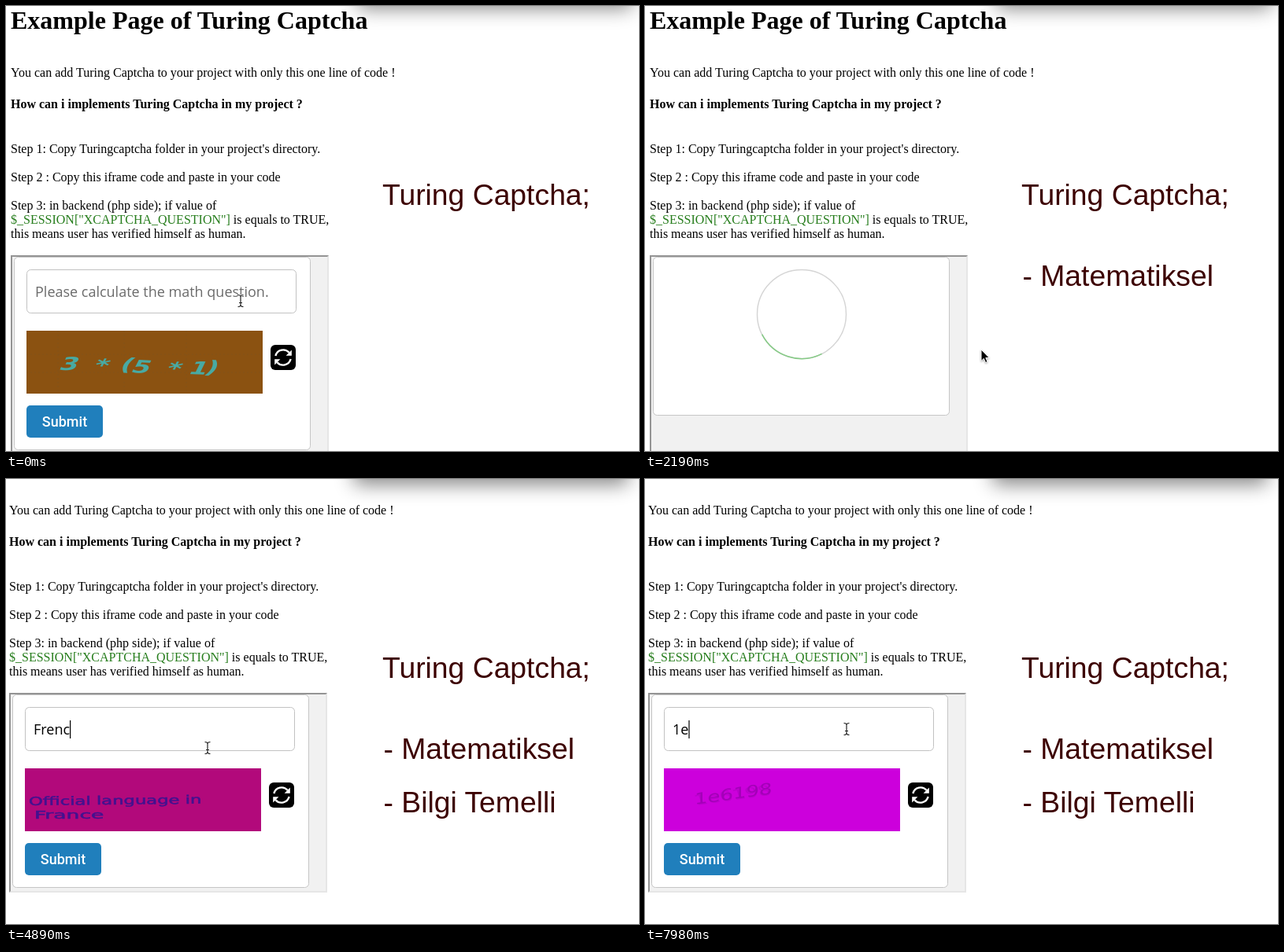
Write an HTML page that moves like this. It is 804x566 px and loops after 8 s.

```html
<!DOCTYPE html>
<html lang="en">
<head>
<meta charset="utf-8">
<title>Turing Captcha</title>
<style>
  html, body { margin: 0; width: 100%; height: 100%; overflow: hidden; background: #fff; }
  #stage { position: relative; width: 804px; height: 566px; overflow: hidden; background: #fff; }
  svg { position: absolute; inset: 0; display: block; }
  #shadow {
    position: absolute; left: 446px; top: -44px; width: 350px; height: 40px;
    border-radius: 8px; box-shadow: 0 7px 24px rgba(0, 0, 0, .48);
  }
  .page { font: 16px "Liberation Serif", Times, serif; fill: #000; }
  .page .title { font-size: 32px; font-weight: bold; }
  .page .bold { font-weight: bold; }
  .page .code { fill: #267d1c; }
  .notes { font: 37.3px "Liberation Sans", Helvetica, sans-serif; fill: #3c0000; }
  .field { font: 18px "Open Sans", sans-serif; }
  .submit { font: 500 18px Roboto, sans-serif; fill: #fff; text-anchor: middle; }
  .hint { font: 13px Inter, sans-serif; fill: #111; }
  .sum { font: bold 24px "DejaVu Sans", sans-serif; fill: #48aaa3; }
  .quiz { font: 14px "DejaVu Sans", sans-serif; fill: #43128f; stroke: #43128f; stroke-width: .5; }
  .hash { font: 23px "DejaVu Sans", sans-serif; fill: #a300b8; }
  .drop { filter: drop-shadow(0 2px 3px rgba(0, 0, 0, .35)); }
  .pointer { filter: drop-shadow(0 1px 1px rgba(0, 0, 0, .35)); }
</style>
</head>
<body>
<div id="stage">
  <svg width="804" height="566" viewBox="0 0 804 566">
    <g id="page">
      <g class="page">
        <text class="title" x="6" y="29">Example Page of Turing Captcha</text>
        <text x="6" y="90">You can add Turing Captcha to your project with only this one line of code !</text>
        <text class="bold" x="6" y="130">How can i implements Turing Captcha in my project ?</text>
        <text x="6" y="187">Step 1: Copy Turingcaptcha folder in your project's directory.</text>
        <text x="6" y="223">Step 2 : Copy this iframe code and paste in your code</text>
        <text x="6" y="259">Step 3: in backend (php side); if value of</text>
        <text x="6" y="277"><tspan class="code">$_SESSION["XCAPTCHA_QUESTION"]</tspan> is equals to TRUE,</text>
        <text x="6" y="295">this means user has verified himself as human.</text>
      </g>

      <rect x="6" y="317" width="404" height="254" fill="#e6e6e6"/>
      <path d="M6 571V317H410L408 319H8V569Z" fill="#949494"/>
      <rect x="8" y="319" width="400" height="250" fill="#f1f1f1"/>
      <rect id="card" x="10.5" y="319.5" width="376" height="245" rx="5" fill="#fff" stroke="#c6c6c6"/>

      <g id="form">
        <rect x="26.5" y="335.5" width="342" height="55" rx="5" fill="#fff" stroke="#c2c2c2"/>
        <text id="typed" class="field" x="37" y="370"></text>
        <rect id="caret" y="352" width="1.2" height="23"/>

        <g id="captchas">
          <g>
            <rect x="26" y="413" width="300" height="80" fill="#8b5211"/>
            <path d="M26 443H326M26 466H326M66 413V493M150 413V493M229 413V493" stroke="#7d5220" stroke-dasharray="2 3" opacity=".6"/>
            <g id="sum" class="sum"></g>
          </g>
          <g>
            <rect x="26" y="413" width="300" height="80" fill="#b2097b"/>
            <g class="quiz">
              <text transform="translate(31 460) rotate(-.6) scale(1.62 1.05)">Official language in</text>
              <text transform="translate(38 477) scale(1.9 1.05)">France</text>
            </g>
          </g>
          <g>
            <rect x="26" y="413" width="300" height="80" fill="#cc00dc"/>
            <g class="hash">
              <text transform="translate(65 459) rotate(-8) skewX(-8) scale(1.14 .85)">1e6198</text>
              <text transform="translate(67 460) rotate(-8) skewX(12) scale(1.12 .8)" opacity=".4">1e6198</text>
            </g>
          </g>
        </g>

        <g transform="translate(352 447)">
          <rect x="-16" y="-16" width="32" height="32" rx="6"/>
          <g id="arrows" fill="none" stroke="#fff" stroke-width="2.4">
            <path d="M-9.6 -2A10 10 0 0 1 7.6 -6.2"/>
            <path d="M10.8 -9.5V-2.3H3.6Z" fill="#fff" stroke="none"/>
            <path d="M9.6 2A10 10 0 0 1 -7.6 6.2"/>
            <path d="M-10.8 9.5V2.3H-3.6Z" fill="#fff" stroke="none"/>
          </g>
        </g>

        <rect x="26" y="508" width="97" height="41" rx="5" fill="#207fbc"/>
        <text class="submit" x="74.5" y="535">Submit</text>

        <g id="hint">
          <rect class="drop" x="26" y="392" width="343" height="52" rx="3" fill="#fff"/>
          <text class="hint" x="38" y="423">fe017e</text>
        </g>
      </g>

      <g id="loader" transform="translate(199 392)" fill="none" stroke-width="1.5">
        <circle r="56.5" stroke="#d5d5d5"/>
        <path id="arc" d="M-39.95 39.95A56.5 56.5 0 0 1 -39.95 -39.95" stroke="#86cb86"/>
      </g>
    </g>

    <g class="notes">
      <text x="478" y="253">Turing Captcha;</text>
      <text id="math" x="479.5" y="356">- Matematiksel</text>
      <text id="facts" x="479.5" y="424">- Bilgi Temelli</text>
    </g>

    <g id="cursor">
      <g id="beam" fill="none">
        <path d="M-3.5 -7.5Q0 -7.5 0 -5Q0 -7.5 3.5 -7.5M0 -5V5M-3.5 7.5Q0 7.5 0 5Q0 7.5 3.5 7.5M-2 2.5H2" stroke="#fff" stroke-width="2.6"/>
        <path d="M-3.5 -7.5Q0 -7.5 0 -5Q0 -7.5 3.5 -7.5M0 -5V5M-3.5 7.5Q0 7.5 0 5Q0 7.5 3.5 7.5M-2 2.5H2" stroke="#222" stroke-width="1.2"/>
      </g>
      <path id="arrow" class="pointer" d="M0 0V14.5L3.3 11.4L5.6 16.6L8 15.5L5.8 10.5H10.2Z" stroke="#fff"/>
      <g id="hand" class="pointer" stroke="#111" fill="#fff">
        <path d="M-1.3 1Q0 -1.2 1.4 1L2.8 6Q4.2 4.8 5.2 6.4Q6.6 5.4 7.6 7Q9.6 6.4 10 9V13L8.6 17H1.2L-4 10.5Q-3.4 8.2 -.2 10.2Z"/>
        <path d="M3.6 11V14M5.7 11V14M7.7 11V14" fill="none"/>
      </g>
    </g>
  </svg>
  <div id="shadow"></div>
</div>

<script>
  const LOOP = 8000;
  const $ = id => document.getElementById(id);
  const PLACEHOLDER = "Please calculate the math question.";

  // [time, field text]
  const typing = [
    [0, ""], [390, "1"], [540, "15"], [2730, ""],
    [3540, "F"], [3990, "Fr"], [4260, "Fre"], [4500, "Fren"], [4770, "Frenc"], [5040, "French"],
    [7350, ""], [7710, "1"], [7890, "1e"]
  ];
  // [time, captcha index]
  const captchas = [[0, 0], [2730, 1], [7350, 2]];
  const loading = [[1230, 2730], [5730, 7350]];
  const focused = [[390, 780], [3420, 5250], [7620, 8000]];
  // [time, x, y, shape]
  const moves = [
    [0, 298, 375, "beam"], [600, 298, 375, "beam"], [810, 180, 465, "arrow"],
    [960, 112, 528, "hand"], [1230, 112, 528, "arrow"], [1950, 427, 437, "arrow"],
    [2850, 427, 437, "arrow"], [3150, 300, 346, "beam"], [3270, 256, 342, "beam"],
    [3540, 256, 342, ""], [4710, 256, 342, "beam"], [5160, 256, 342, "beam"],
    [5280, 210, 390, "arrow"], [5490, 112, 482, "hand"], [5730, 112, 482, "arrow"],
    [6390, 231, 390, "arrow"], [7350, 231, 390, "arrow"], [7440, 250, 335, "beam"],
    [7530, 256, 318, "beam"], [LOOP, 256, 318, "beam"]
  ];

  // [glyph, x, baseline, tilt]
  [["3", 66, 463, 0], ["*", 109, 464, 4], ["(", 143, 463, 4], ["5", 157, 466, 3],
   ["*", 201, 468, 4], ["1", 230, 468, 2], [")", 251, 467, 2]].forEach(([glyph, x, y, tilt]) => {
    const text = document.createElementNS("http://www.w3.org/2000/svg", "text");
    text.textContent = glyph;
    text.setAttribute("transform", `translate(${x} ${y}) rotate(${tilt}) skewX(-24) scale(1.4 .95)`);
    $("sum").append(text);
  });

  const clamp = v => Math.min(1, Math.max(0, v));
  const ease = v => v * v * (3 - 2 * v);
  const ramp = (t, start, length) => ease(clamp((t - start) / length));
  const show = (el, on) => el.style.display = on ? "" : "none";
  const latest = (list, t) => list.findLast(item => item[0] <= t);
  const within = (spans, t) => spans.find(([from, to]) => t >= from && t < to);

  function drawForm(t) {
    const busy = within(loading, t);
    show($("form"), !busy);
    show($("loader"), busy);
    $("card").setAttribute("height", busy ? 201 : 245);
    if (busy) {
      $("arc").setAttribute("transform", `rotate(${(t - busy[0]) / 1200 * 360})`);
      return;
    }
    const value = latest(typing, t)[1];
    const field = $("typed");
    const label = value || PLACEHOLDER;
    if (field.textContent !== label) field.textContent = label;
    field.setAttribute("fill", value ? "#000" : "#6b6b6b");
    show($("caret"), within(focused, t));
    $("caret").setAttribute("x", 37 + (value ? field.getComputedTextLength() : 0));
    show($("hint"), value === "F");
    const current = latest(captchas, t)[1];
    [...$("captchas").children].forEach((el, i) => show(el, i === current));
  }

  function drawCursor(t) {
    const i = moves.findLastIndex(m => m[0] <= t);
    const [t0, x0, y0, shape] = moves[i];
    const [t1, x1, y1] = moves[i + 1];
    const k = ease((t - t0) / (t1 - t0));
    $("cursor").setAttribute("transform", `translate(${x0 + (x1 - x0) * k} ${y0 + (y1 - y0) * k})`);
    for (const id of ["beam", "arrow", "hand"]) show($(id), id === shape);
  }

  function draw(now) {
    const t = Math.floor(now % LOOP / 30) * 30;
    const scroll = ramp(t, 2760, 360);
    $("page").setAttribute("transform", `translate(${-2 * scroll} ${-45 * scroll})`);
    $("shadow").style.transform = `translate(${-5 * scroll}px, ${4 * scroll}px)`;
    $("math").style.opacity = ramp(t, 420, 300);
    $("facts").style.opacity = ramp(t, 2940, 300);
    drawForm(t);
    drawCursor(t);
  }

  const start = performance.now();
  function tick() {
    draw(performance.now() - start);
    requestAnimationFrame(tick);
  }
  tick();
</script>
</body>
</html>
```
